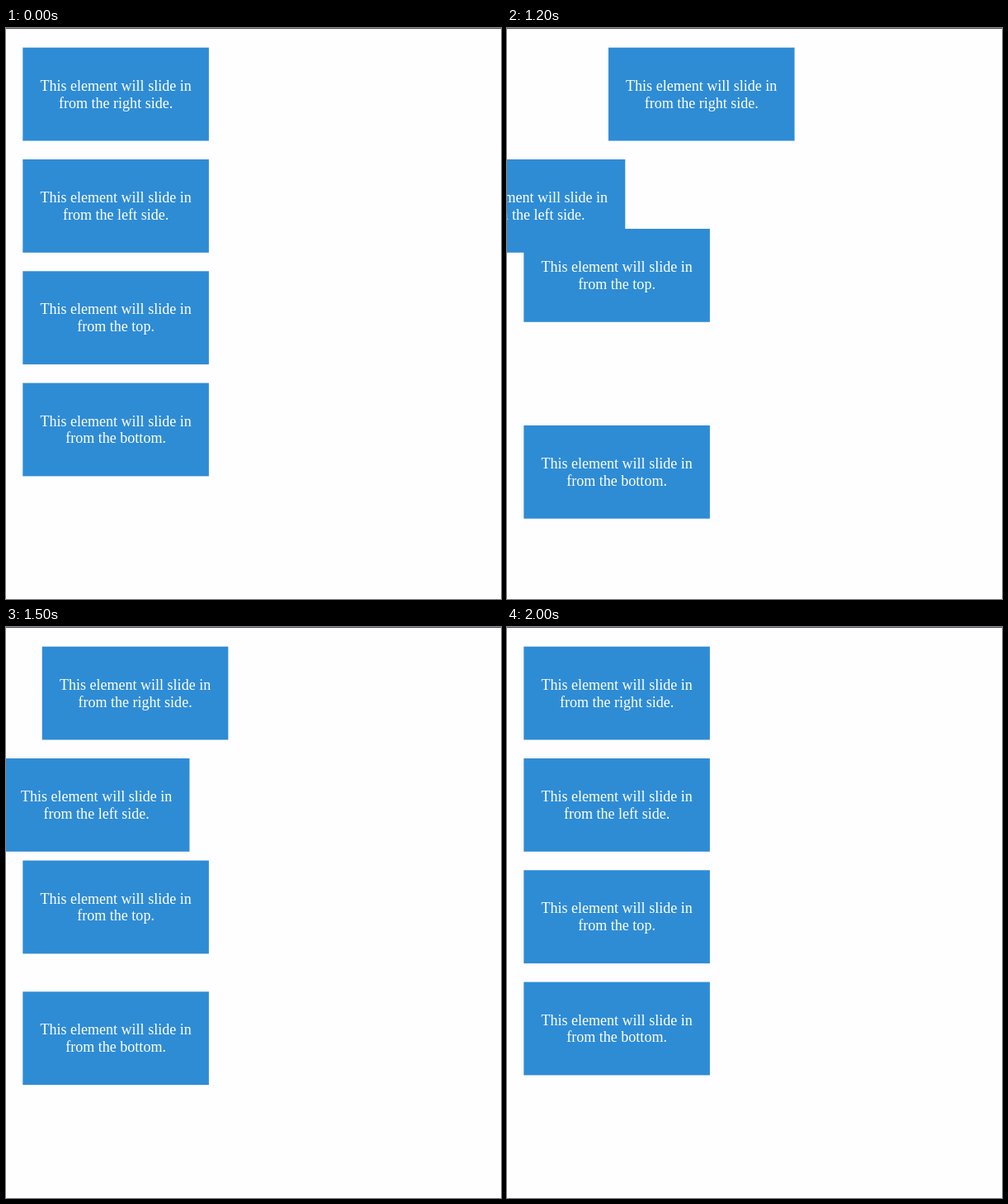
An HTML page that plays this animation: 600 by 691 pixels, repeating every 2.8 s.

```html
<!DOCTYPE html>
<html lang="en">
<head>
<meta charset="utf-8">
<title>Slide-in boxes</title>
<style>
  html, body { margin: 0; width: 100%; height: 100%; overflow: hidden; background: #fefdff; }
  svg { display: block; width: 600px; height: 691px; }
  text { font: 18.05px "Liberation Serif", "Times New Roman", serif; fill: #fff; text-anchor: middle; }
</style>
</head>
<body>
<svg id="stage" viewBox="0 0 600 691"></svg>
<script>
const LOOP = 2800, STEP = 100;
const SLIDE_START = 883.5, SLIDE_TIME = 1000;
const LEFT = 20.3, TOP = 23.7, WIDTH = 225.6, HEIGHT = 112.8, PITCH = 135.3;

// Each box starts one box size away, in direction (dx, dy).
const boxes = [
  { line: 'from the right side.', dx: 1, dy: 0 },
  { line: 'from the left side.', dx: -1, dy: 0 },
  { line: 'from the top.', dx: 0, dy: -1 },
  { line: 'from the bottom.', dx: 0, dy: 1 },
];

const stage = document.getElementById('stage');

function add(parent, tag, attrs, label = '') {
  const node = document.createElementNS('http://www.w3.org/2000/svg', tag);
  for (const key in attrs) node.setAttribute(key, attrs[key]);
  node.textContent = label;
  return parent.appendChild(node);
}

for (const box of boxes) {
  box.group = add(stage, 'g', {});
  add(box.group, 'rect', { width: WIDTH, height: HEIGHT, fill: '#2e8cd5' });
  add(box.group, 'text', { x: WIDTH / 2, y: 52.1 }, 'This element will slide in');
  add(box.group, 'text', { x: WIDTH / 2, y: 72.9 }, box.line);
}
add(stage, 'rect', { width: 600, height: 1, fill: '#4c4b4e' });

const bezier = (a, b, u) => 3 * a * u * (1 - u) ** 2 + 3 * b * u * u * (1 - u) + u ** 3;

// The CSS "ease" curve, cubic-bezier(.25, .1, .25, 1).
function ease(t) {
  if (t <= 0 || t >= 1) return t <= 0 ? 0 : 1;
  let low = 0, high = 1;
  for (let i = 0; i < 30; i++) {
    const mid = (low + high) / 2;
    if (bezier(0.25, 0.25, mid) < t) low = mid; else high = mid;
  }
  return bezier(0.1, 1, low);
}

function render(ms) {
  const time = Math.floor((ms % LOOP) / STEP) * STEP;
  const away = time < 1000 ? 0 : 1 - ease((time - SLIDE_START) / SLIDE_TIME);
  boxes.forEach(({ group, dx, dy }, row) => {
    const x = LEFT + dx * away * WIDTH;
    const y = TOP + row * PITCH + dy * away * HEIGHT;
    group.setAttribute('transform', `translate(${x.toFixed(2)} ${y.toFixed(2)})`);
  });
}

const start = performance.now();
function tick() {
  render(performance.now() - start);
  requestAnimationFrame(tick);
}
tick();
</script>
</body>
</html>
```
